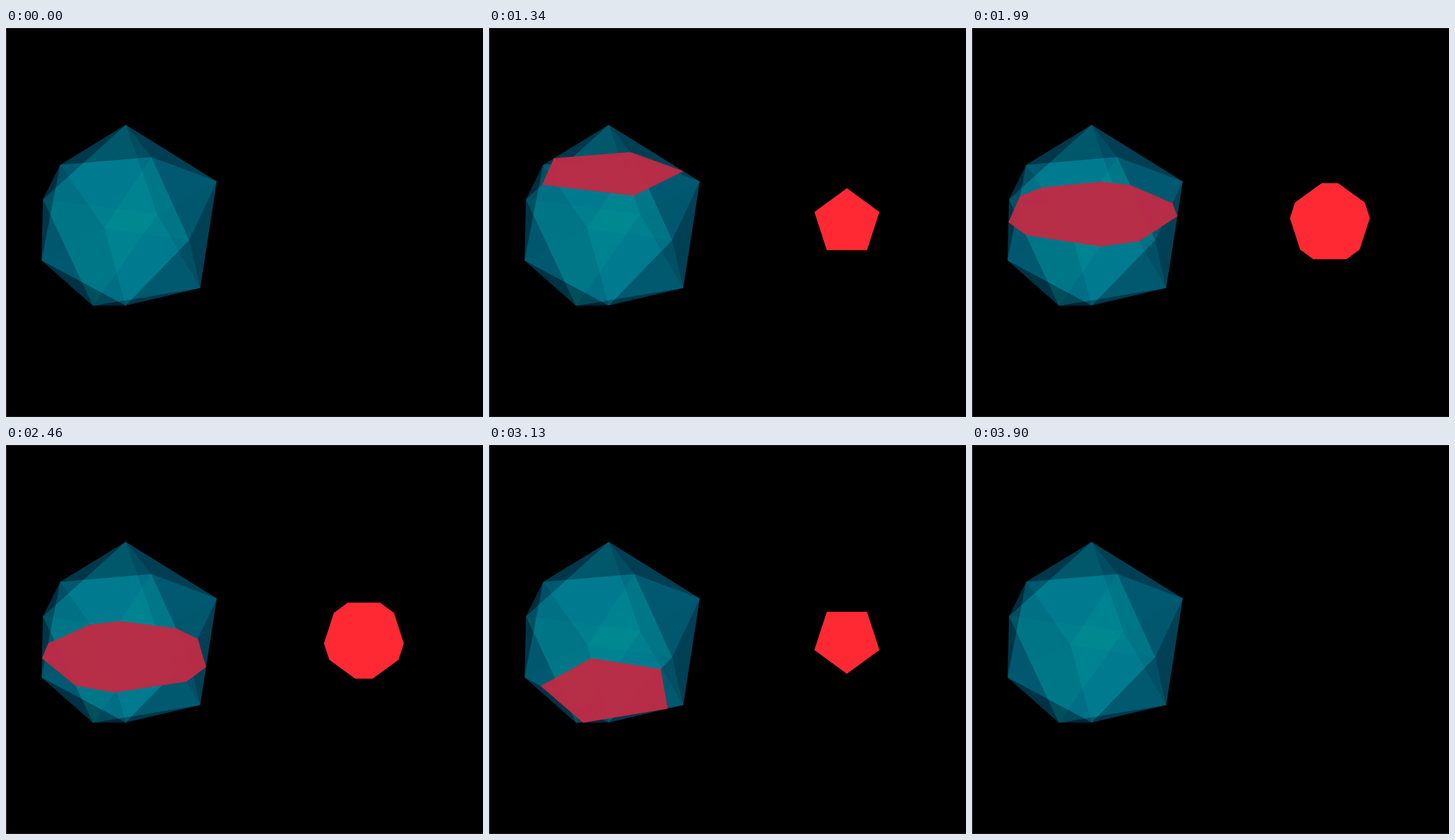
An HTML page with a canvas for the animation above (4.41 s loop, 829 by 675 pixels).

```html
<!DOCTYPE html>
<html lang="en">
<head>
<meta charset="utf-8">
<title>Slicing an icosahedron</title>
<style>
  html, body { margin: 0; width: 829px; height: 675px; overflow: hidden; background: #000; }
  canvas { display: block; }
</style>
</head>
<body>
<canvas id="stage" width="829" height="675"></canvas>
<script>
const stage = document.getElementById('stage');
const ctx = stage.getContext('2d');

const LOOP = 4410;
const SLICE_START = 650;
const STEP_TIME = 27.2;
const STEPS = 120;

const RING_RADIUS = 2 / Math.sqrt(5);
const RING_HEIGHT = 1 / Math.sqrt(5);
const FACE_DISTANCE = 0.7947; // inradius for a circumradius of 1

const view = { x: 208, y: 337.5, scale: 170, depth: 0.203, turn: 16.85 * Math.PI / 180, tilt: Math.asin(0.4) };
const plan = { x: 622, y: 337.5, scale: 81.6 };

function ringPoint(fifths, h) {
  const angle = fifths * 2 * Math.PI / 5;
  return { x: RING_RADIUS * Math.sin(angle), z: RING_RADIUS * Math.cos(angle), h };
}

const apex = { x: 0, z: 0, h: 1 };
const base = { x: 0, z: 0, h: -1 };
const faces = [];
const edges = [];
for (let i = 0; i < 5; i++) {
  const upper = ringPoint(i, RING_HEIGHT);
  const nextUpper = ringPoint(i + 1, RING_HEIGHT);
  const lower = ringPoint(i + 0.5, -RING_HEIGHT);
  const nextLower = ringPoint(i + 1.5, -RING_HEIGHT);
  faces.push([apex, upper, nextUpper], [upper, nextUpper, lower],
             [lower, nextLower, nextUpper], [base, lower, nextLower]);
  edges.push([apex, upper], [upper, lower], [nextUpper, lower], [lower, base]);
}

// Camera space: right, up and toward the viewer
function toCamera({ x, z, h }) {
  const near = z * Math.cos(view.turn) - x * Math.sin(view.turn);
  return {
    right: x * Math.cos(view.turn) + z * Math.sin(view.turn),
    up: h * Math.cos(view.tilt) - near * Math.sin(view.tilt),
    toward: h * Math.sin(view.tilt) + near * Math.cos(view.tilt)
  };
}

function project(point) {
  const { right, up, toward } = toCamera(point);
  const zoom = view.scale / (1 - view.depth * toward);
  return [view.x + right * zoom, view.y - up * zoom];
}

const flatten = ({ x, z }) => [plan.x + x * plan.scale, plan.y - z * plan.scale];

// Faces brighten as they turn to the camera; the brightest shift to green
function shade(face) {
  const toward = face.reduce((sum, point) => sum + toCamera(point).toward, 0) / 3;
  const facing = Math.abs(toward) / FACE_DISTANCE;
  const green = 12 + 60 * facing;
  const blue = 20 + 66 * facing - 20 * facing ** 10;
  return `rgb(0,${Math.round(green)},${Math.round(blue)})`;
}

function fillPolygon(points, color) {
  ctx.beginPath();
  points.forEach(([x, y]) => ctx.lineTo(x, y));
  ctx.closePath();
  ctx.fillStyle = color;
  ctx.fill();
}

function crossSection(h) {
  const mix = (a, b, u) => a + (b - a) * u;
  return edges
    .filter(([a, b]) => a.h >= h && b.h < h)
    .map(([a, b]) => {
      const u = (a.h - h) / (a.h - b.h);
      return { x: mix(a.x, b.x, u), z: mix(a.z, b.z, u), h };
    })
    .sort((p, q) => Math.atan2(p.x, p.z) - Math.atan2(q.x, q.z));
}

function drawBackground() {
  const { width, height } = stage;
  ctx.fillStyle = '#000';
  ctx.fillRect(0, 0, width, height);
  ctx.fillStyle = '#222';
  ctx.fillRect(0, 0, width, 1);
  ctx.fillRect(0, height - 1, width, 1);
  ctx.fillStyle = '#444';
  ctx.fillRect(0, 0, 1, height);
}

function drawSolid() {
  ctx.globalCompositeOperation = 'lighter';
  faces.forEach(face => fillPolygon(face.map(project), shade(face)));
  ctx.globalCompositeOperation = 'source-over';
}

function drawSlice(t) {
  const step = Math.floor((t - SLICE_START) / STEP_TIME) + 2;
  if (t < SLICE_START || step >= STEPS) return;
  const section = crossSection(1 - 2 * step / STEPS);
  fillPolygon(section.map(project), 'rgba(191,43,69,0.96)');
  fillPolygon(section.map(flatten), '#ff2934');
}

function tick() {
  const t = performance.now() % LOOP;
  drawBackground();
  drawSolid();
  drawSlice(t);
  requestAnimationFrame(tick);
}
tick();
</script>
</body>
</html>
```
